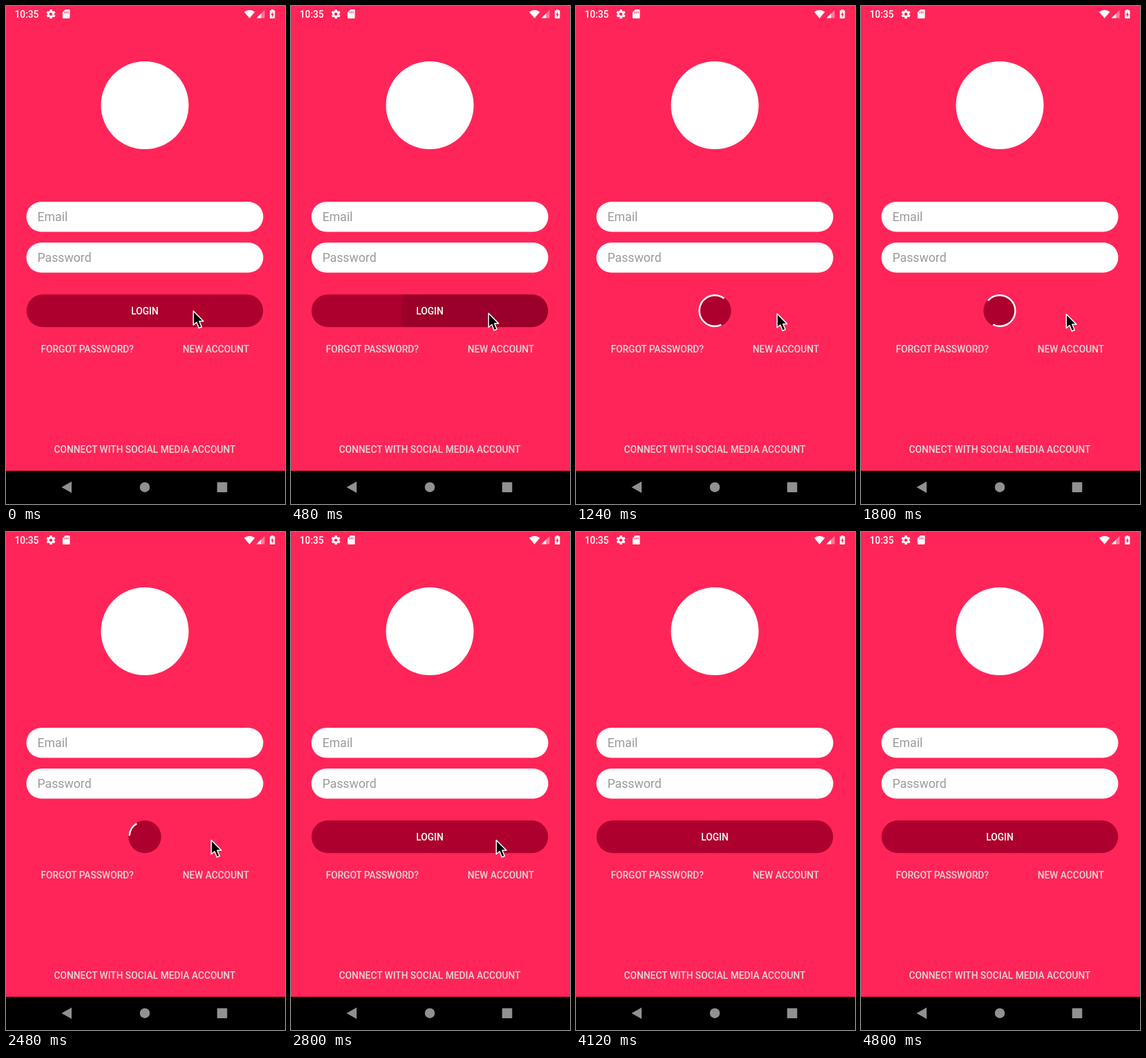
An HTML page that plays this animation: 404x720 px, repeating every 4.84 s.

```html
<!DOCTYPE html>
<html lang="en">
<head>
<meta charset="utf-8">
<title>Login button</title>
<style>
  html, body { margin: 0; width: 100%; height: 100%; overflow: hidden; background: #ff2558; }
  svg { display: block; width: 404px; height: 720px; }
  text { font-family: Roboto, sans-serif; font-size: 13.75px; font-weight: 500; }
  .hint { font-size: 17.7px; font-weight: 400; fill: #9a9a9a; }
  .link { fill: #dedadb; text-anchor: middle; }
</style>
</head>
<body>
<svg viewBox="0 0 404 720">
  <defs>
    <clipPath id="clip"><rect id="clipBox" y="417" height="47.3" rx="23.6"/></clipPath>
  </defs>
  <rect width="404" height="720" fill="#ff2558"/>

  <!-- status bar -->
  <g fill="#fff">
    <text x="12.5" y="17">10:35</text>
    <g transform="translate(65 11.7)">
      <g id="teeth"></g>
      <circle r="3.6" fill="none" stroke="#fff" stroke-width="2.6"/>
    </g>
    <path d="M86 5h5.2q1.3 0 1.3 1.3v10.4q0 1.3-1.3 1.3h-8q-1.3 0-1.3-1.3V9.2z"/>
    <path d="M85.3 8v2.6M87.6 8v2.6M89.9 8v2.6" stroke="#ff2558" stroke-width="1.1"/>
    <path d="M344.8 8.5q7.8-5.6 15.6 0L352.6 17.8z"/>
    <path d="M374.5 5.8V17.6H362.7z" opacity=".4"/>
    <path d="M369.3 11V17.6H362.7z"/>
    <path d="M384.2 5h3v1.3h1.4q.8 0 .8.8v10q0 .9-.8.9h-5.8q-.8 0-.8-.9v-10q0-.8.8-.8h1.4z"/>
    <path d="M386.3 8.2v3.2h1.6l-2.8 5v-3.6h-1.6z" fill="#ff2558"/>
  </g>

  <circle cx="201" cy="143.5" r="63.5" fill="#fff"/>

  <g fill="#fff">
    <rect x="29.5" y="283" width="343" height="43.5" rx="21.7"/>
    <rect x="29.5" y="342" width="343" height="43.5" rx="21.7"/>
  </g>
  <text class="hint" x="45.5" y="311.3">Email</text>
  <text class="hint" x="45.5" y="370.3">Password</text>

  <!-- button -->
  <rect id="button" y="417" height="47.3" rx="23.6" fill="#ad002e"/>
  <g clip-path="url(#clip)"><circle id="ripple" cx="286" cy="443"/></g>
  <path id="arc" fill="none" stroke="#fff" stroke-width="2.5"/>
  <text id="label" x="201" y="445.8" fill="#fff" text-anchor="middle">LOGIN</text>

  <text class="link" x="117.7" y="501.2">FORGOT PASSWORD?</text>
  <text class="link" x="304" y="501.2">NEW ACCOUNT</text>
  <text class="link" x="201" y="646.2">CONNECT WITH SOCIAL MEDIA ACCOUNT</text>

  <!-- navigation bar -->
  <rect y="672" width="404" height="48"/>
  <g fill="#919191">
    <path d="M80.5 695.7L95 687.5V704z"/>
    <circle cx="201" cy="695.7" r="7.2"/>
    <rect x="305.7" y="688.5" width="14.6" height="14.6" rx="1"/>
  </g>

  <path id="cursor" d="M0 0V20.2L4.7 16.2 8 24.6 12 23 8.6 14.8H14.6z"
        stroke="#fff" stroke-width="1.5" stroke-linejoin="round"/>
</svg>
<script>
const LOOP = 4840, STEP = 40;
const PRESS = 380, SHRINK = 497, SPIN = 800, GROW = 2495, MORPH = 300, HIDE = 4100;
const FULL = 342.6, ROUND = 47.3, CX = 201, CY = 440.6;
const $ = id => document.getElementById(id);
const set = (el, attrs) => { for (const k in attrs) el.setAttribute(k, attrs[k]); };
const ramp = (t, start, length) => Math.min(1, Math.max(0, (t - start) / length));
const ease = p => (1 - Math.cos(Math.PI * p)) / 2;

$('teeth').innerHTML = Array.from({ length: 6 }, (_, i) =>
  `<rect x="-1.7" y="-6.6" width="3.4" height="3" rx=".6" transform="rotate(${i * 60})"/>`).join('');

function point(deg, r) {
  const a = deg * Math.PI / 180;
  return `${CX + r * Math.cos(a)} ${CY + r * Math.sin(a)}`;
}

// The arc lengthens and shortens in turn while the whole ring rotates.
function spinner(age) {
  const phase = Math.floor(age / 900);
  const p = age % 900 / 900;
  const sweep = 260 * (1 - (1 - p) ** 2);
  const growing = phase % 2 === 0;
  const base = age * 0.18 - 14 - 100 * Math.floor(phase / 2);
  const start = growing ? base : base + sweep;
  const span = growing ? sweep + 50 : 310 - sweep;
  return `M${point(start, 22.4)}A22.4 22.4 0 ${span > 180 ? 1 : 0} 1 ${point(start + span, 22.4)}`;
}

function draw(t) {
  const shrunk = ease(ramp(t, SHRINK, MORPH)) - ease(ramp(t, GROW, MORPH));
  const width = FULL + (ROUND - FULL) * shrunk;
  const box = { x: CX - width / 2, width };
  set($('button'), box);
  set($('clipBox'), box);

  set($('ripple'), {
    r: 270 * ramp(t, PRESS, 214),
    opacity: 0.11 * (1 - ramp(t, 720, 280))
  });

  const spinning = t >= SPIN && t < GROW;
  set($('arc'), { d: spinning ? spinner(t - SPIN) : '' });
  set($('label'), { opacity: t < SHRINK || t >= GROW + MORPH ? 1 : 0 });

  const a = ease(ramp(t, 0, 340)), b = ease(ramp(t, 1100, 300));
  set($('cursor'), {
    transform: `translate(${271.3 + 14.8 * a + 11.2 * b} ${441 + 3.3 * a + 1.2 * b})`,
    opacity: t < HIDE ? 1 : 0
  });
}

function tick() {
  const t = performance.now() % LOOP;
  draw(Math.floor(t / STEP) * STEP);
  requestAnimationFrame(tick);
}
tick();
</script>
</body>
</html>
```
